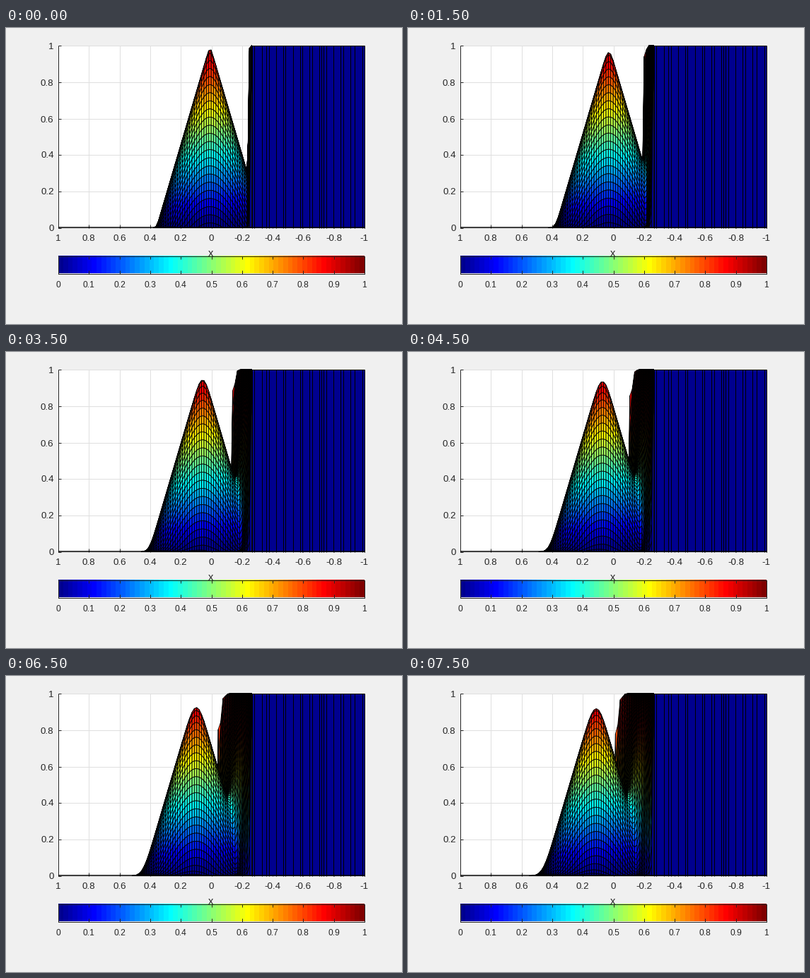
Animation, 560 px wide and 420 px high, one loop 8 s. Source, as a matplotlib script:

```python
import numpy as np
import matplotlib.pyplot as plt
from matplotlib.animation import FuncAnimation
from matplotlib.collections import LineCollection, PolyCollection
from matplotlib.patches import Rectangle

W, H, DPI = 560, 420, 100
FRAMES, INTERVAL = 16, 500
N = 64                                   # cells per unit length
LEFT, RIGHT, TOP, BOTTOM = 73.5, 506.5, 24.5, 283.5
BAR_TOP, BAR_BOTTOM = 323.5, 348.5
INK = "#262626"
PX = 72 / DPI                            # one pixel in points

plt.rcParams["font.family"] = "Liberation Sans"


def sx(x):
    return (LEFT + RIGHT) / 2 - x * (RIGHT - LEFT) / 2


def sz(z):
    return BOTTOM - z * (BOTTOM - TOP)


def jet64():
    i = np.arange(1, 65)
    ramp = lambda o: np.clip(np.minimum(i - o, o + 48 - i) / 16, 0, 1)
    return np.stack([ramp(24), ramp(8), ramp(-8)], axis=1)


JET = jet64()
x = np.arange(-N, N + 1) / N
y = np.arange(N + 1) / N
X, Y = np.meshgrid(x, y)


def simulate(steps):
    """Upwind transport of a cone and a step by solid rotation."""
    q = np.maximum(0, 1 - np.hypot(X, Y - 0.45) / 0.35)
    q[X < -0.25] = 1
    u, v = Y[1:-1, 1:-1], -X[1:-1, 1:-1]
    states = []
    for _ in range(steps):
        c = q[1:-1, 1:-1]
        dx = c - q[1:-1, :-2]
        dy = np.where(v > 0, c - q[:-2, 1:-1], q[2:, 1:-1] - c)
        q = q.copy()
        q[1:-1, 1:-1] = c - u * dx - v * dy
        states.append(q)
    return states


STATES = simulate(FRAMES)
EDGE = N - 17                            # last column of the step
COLS = slice(EDGE, N + 48)


def mesh(q):
    """Visible quads from back to front, with their flat colours."""
    z = np.clip(q[:N, COLS], 0, 1)
    z[0] = 0
    px, pz = sx(X[:N, COLS]), sz(z)
    p = np.stack([px, pz], axis=-1)
    quads = np.stack([p[:-1, :-1], p[:-1, 1:], p[1:, 1:], p[1:, :-1]], axis=2)
    level = np.minimum((z[:-1, :-1] * 64).astype(int), 63)
    quads = quads[::-1].reshape(-1, 4, 2)
    level = level[::-1].ravel()
    keep = quads[:, :, 1].min(axis=1) < BOTTOM - 0.15
    return quads[keep], JET[level[keep]]


fig = plt.figure(figsize=(W / DPI, H / DPI), dpi=DPI, facecolor="#f0f0f0")
ax = fig.add_axes([0, 0, 1, 1])
ax.set_xlim(0, W)
ax.set_ylim(H, 0)
ax.axis("off")


def lines(segs, color, z, width=1):
    ax.add_collection(LineCollection(segs, colors=[color], linewidths=width * PX,
                                     capstyle="butt", zorder=z))


def label(px, py, s, size, ha="center"):
    ax.text(px, py, s, fontsize=size * PX, color=INK, ha=ha,
            va="center_baseline", zorder=9)


def snap(p):
    return np.floor(p) + 0.5


def text(v):
    return f"{v:.1f}".rstrip("0").rstrip(".") if abs(v) > 0.01 else "0"


ax.add_patch(Rectangle((LEFT, TOP), RIGHT - LEFT, BOTTOM - TOP, fc="white", lw=0))

# grid, ticks and axis labels
for v in np.linspace(-1, 1, 11):
    p = snap(sx(v))
    lines([[(p, TOP), (p, BOTTOM)]], "#dfdfdf", 2)
    lines([[(p, BOTTOM), (p, BOTTOM - 4.5)]], INK, 3)
    label(p, 298, text(v), 13.33)
for v in np.linspace(0, 1, 6):
    p = snap(sz(v))
    lines([[(LEFT, p), (RIGHT, p)]], "#dfdfdf", 2)
    lines([[(LEFT, p), (LEFT + 4.5, p)]], INK, 3)
    label(67.5, p + 0.5, text(v), 13.33, "right")
lines([[(LEFT, TOP), (LEFT, BOTTOM + 0.5)]], INK, 3)
label(290, 318.5, "x", 14.67)

# moving surface
surface = PolyCollection([], edgecolors="black", linewidths=0.85 * PX,
                         joinstyle="bevel", zorder=4)
ax.add_collection(surface)

# inflow wall with the mesh lines that show through
wall = sx(x[EDGE])
ax.add_patch(Rectangle((wall, TOP), RIGHT - wall, BOTTOM - TOP, fc=JET[0],
                       lw=0, zorder=5))
seen = [17, 18, 21, 23, 24, 27, 30, 31, 34, 37, 38, 41, 42, 45, 46, 47, 48,
        51, 54, 55, 58, 60, 63, 64]
lines([[(p, TOP), (p, BOTTOM)] for p in (snap(sx(-k / N)) for k in seen)],
      "black", 6)
lines([[(wall, TOP), (RIGHT + 0.5, TOP)]], "black", 6)
lines([[(LEFT, BOTTOM - 0.25), (RIGHT + 0.5, BOTTOM - 0.25)]], "black", 6, 1.5)

# colour bar
ax.imshow(JET[None], extent=(LEFT, RIGHT, BAR_BOTTOM, BAR_TOP), aspect="auto",
          interpolation="nearest", zorder=3)
ax.add_patch(Rectangle((LEFT, BAR_TOP), RIGHT - LEFT, BAR_BOTTOM - BAR_TOP,
                       fill=False, ec=INK, lw=PX, zorder=4))
for v in np.linspace(0, 1, 11):
    p = snap(LEFT + v * (RIGHT - LEFT))
    lines([[(p, BAR_TOP), (p, BAR_TOP + 4.5)],
           [(p, BAR_BOTTOM - 4.5), (p, BAR_BOTTOM)]], INK, 4)
    label(p, 363.5, text(v), 12)

ax.set_xlim(0, W)
ax.set_ylim(H, 0)


def update(i):
    quads, colors = mesh(STATES[i])
    surface.set_verts(quads)
    surface.set_facecolor(colors)
    return (surface,)


anim = FuncAnimation(fig, update, frames=FRAMES, interval=INTERVAL,
                     repeat=True, repeat_delay=0, blit=False)
plt.show()
```
